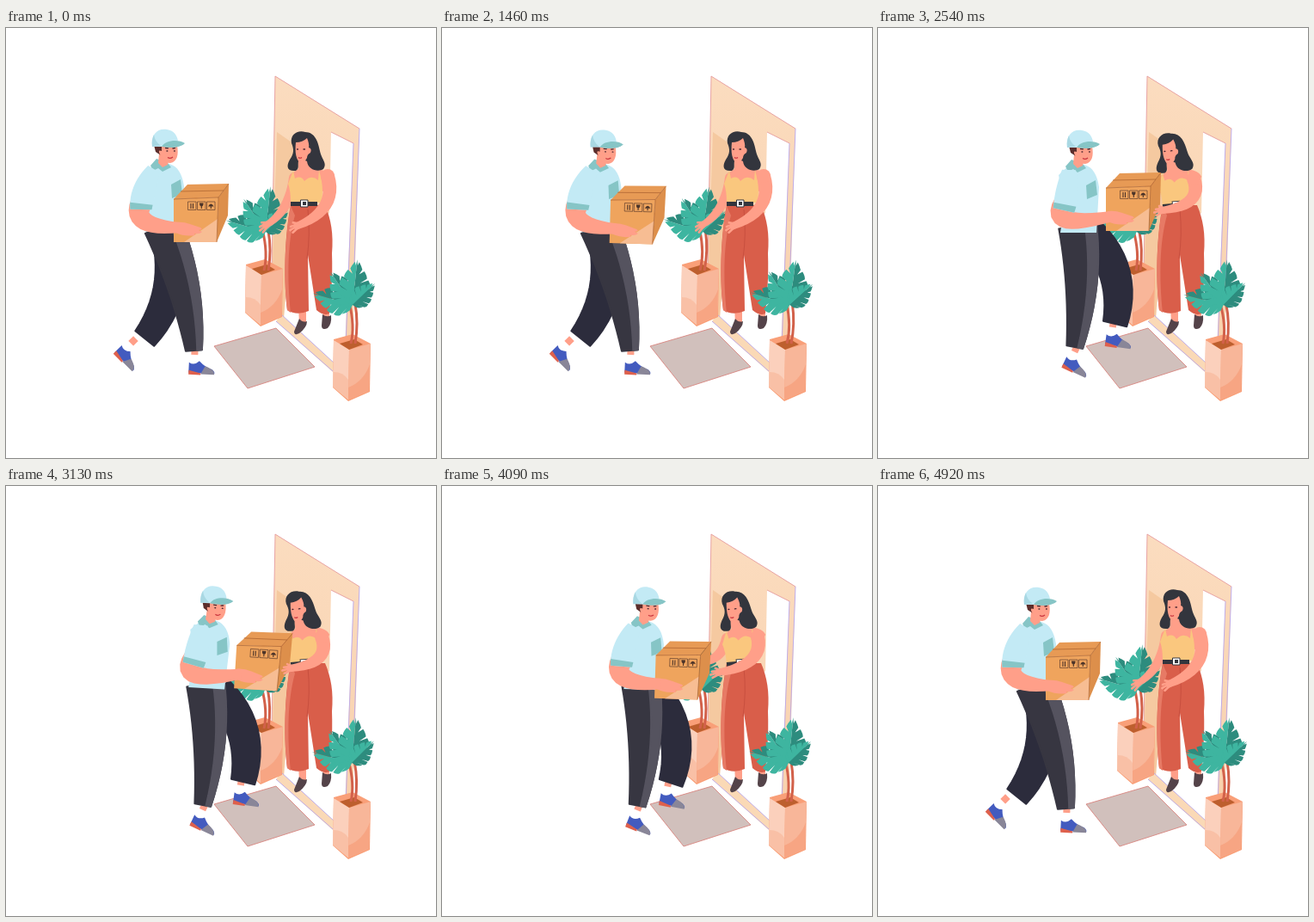
Recreate the animation shown at these times as an HTML page. Size 500x500 px, loop 4.96 s.

```html
<!DOCTYPE html>
<html lang="en">
<head>
<meta charset="utf-8">
<title>Parcel at the door</title>
<style>
html, body { margin: 0; width: 100%; height: 100%; overflow: hidden; background: #fff; }
svg { display: block; width: 100vw; height: 100vh; }
.skin { fill: #ff9f89; }
.shirt { fill: #c3eaf5; }
.teal { fill: #86c5c6; }
.dark { fill: #33353d; }
.pants { stroke-width: 2; stroke-linejoin: round; }
.finger { fill: none; stroke: #ff9f89; stroke-width: 2.6; stroke-linecap: round; }
.face { fill: none; stroke: #4a2730; stroke-width: 1.3; stroke-linecap: round; }
.lips { fill: none; stroke: #c9343e; stroke-width: 1.2; }
.stem { fill: none; stroke: #d2614a; stroke-width: 3; }
</style>
</head>
<body>
<svg viewBox="0 0 500 500">
  <defs>
    <linearGradient id="wall" x1="0" y1="0" x2="0" y2="1">
      <stop offset="0" stop-color="#fbdcbf"/><stop offset="1" stop-color="#f8d0ab"/>
    </linearGradient>
    <g id="shoe">
      <path class="skin" d="M-4 -14H4V-4H-4Z"/>
      <path fill="#fff" d="M-5 -6H5L6 6L-5 7Z"/>
      <path fill="#435bbf" d="M-6 3Q0 7 6 1Q13 8 21 10Q25 13 24 15H-6Z"/>
      <path fill="#898698" d="M13 6.500Q25 10 24 16H8Z"/>
      <path fill="#de604c" d="M-6 12L8 15V17H-6Z"/>
    </g>
    <g id="pot">
      <path fill="#f99f78" d="M0 6L22 0L43 11L42 67L17 78L-1 62Z"/>
      <path fill="#fbd0bc" d="M0 7L18 18L17 76L-1 61Z"/>
      <path fill="#f8b699" d="M18 18L43 11L41 66L17 76Z"/>
      <path fill="#f9c0a6" d="M0 44Q11 44 17 53V76L-1 61Z"/>
      <path fill="#f7a583" d="M42 35Q35 55 17 62V76L41 66Z"/>
      <path fill="#bd5f2e" d="M7 11L24 6L34 12L18 18Z"/>
    </g>
    <g id="plant"></g>
  </defs>

  <!-- doorway -->
  <path fill="url(#wall)" d="M313 56L411 117L402 398H393L404 134L378 121L376 215L330 245L322 338H308Z"/>
  <path fill="#f5c9a0" d="M315 121L338 137L331 242L323 338H308Z"/>
  <path fill="#fad9b6" d="M320 333L382 390L380 400L314 341Z"/>
  <path fill="none" stroke="#e69b9e" stroke-width=".9" d="M308 338L313 56L411 117M378 121L404 134"/>
  <path fill="none" stroke="#b9a6ea" stroke-width=".9" d="M411 117L404 300M404 134L395 370M320 333L382 390M314 341L380 399"/>
  <path fill="#d1c0bc" stroke="#d9857f" stroke-width=".9" d="M242 370L314 349L359 394L281 419Z"/>

  <use href="#pot" x="279" y="269"/>
  <use id="plantB" href="#plant"/>

  <!-- woman -->
  <path class="skin" d="M340 325h9v18h-8zM368 326h8v14h-7z"/>
  <path fill="#544349" d="M341 338Q345 343 350 341Q350 348 341 355Q335 358 335 353ZM368 333Q373 337 378 334Q379 344 374 349Q367 352 367 346Z"/>
  <path fill="#d95e4a" d="M331 206H371C378 222 381 240 379 262C380 290 378 312 376 332Q369 335 361 328L351 264L352 329Q338 335 327 328C322 285 325 236 331 206Z"/>
  <path fill="#e77a65" d="M336 218C327 250 327 292 331 331L327 328C322 285 325 240 331 207Z"/>
  <path fill="none" stroke="#c84f3f" d="M351 211Q354 240 350 268"/>
  <g id="farArm"></g>
  <g id="lady">
    <path class="skin" d="M339 149H353L354 163C366 164 376 166 379 174L370 190H331C328 178 331 168 340 164Z"/>
    <path fill="#fac77e" d="M334 166L336 175Q343 171 347 178Q355 170 363 177L364 165L367 178Q369 190 367 203H331Q331 189 328 181Z"/>
    <path class="dark" d="M331 202H362V207H331Z"/>
    <path class="dark" d="M332 134C330 124 339 118 348 121C359 121 363 132 365 143C367 153 374 157 369 164C363 168 351 165 350 155L341 151C338 159 342 163 337 166C326 167 326 160 330 153C335 146 335 141 332 134Z"/>
    <path class="skin" d="M337 133Q345 133 350 128Q353 135 352 139Q356 140 354 145Q350 147 350 151Q347 157 342 157Q335 151 337 133Z"/>
    <path class="face" d="M338.500 141h1M346 141h1.500"/>
    <path class="lips" d="M340 150.500q2 1.500 4 0"/>
    <path fill="#fff" stroke="#33353d" d="M342.500 200h8.500v8h-8.500z"/>
    <path class="dark" d="M345 202h4v4h-4z"/>
  </g>

  <use href="#pot" x="381" y="356"/>
  <use id="plantF" href="#plant"/>

  <!-- courier -->
  <use id="backShoe" href="#shoe"/>
  <path id="backLeg" class="pants" fill="#2c2c3c" stroke="#2c2c3c"/>
  <use id="frontShoe" href="#shoe"/>
  <path id="frontLeg" class="pants" fill="#373641" stroke="#373641"/>
  <path id="stripe" class="pants" fill="#55535f" stroke="#55535f"/>
  <g id="man">
    <path class="shirt" d="M174 157L190 158C200 161 205 170 207 184L204 237H162L167 205L160 170Z"/>
    <path class="teal" d="M192 182L203 176L205 193L193 198Z"/>
    <path class="teal" d="M168 160L175 152L188 157L192 162L182 167L177 163L171 166Z"/>
    <path class="skin" d="M178 146L190 150L188 159L182 162L177 157Z"/>
    <path fill="#5b2d2b" d="M172 136H185L183 150L174 144Z"/>
    <path class="skin" d="M181 137H199C201 147 199 156 191 157C184 157 180 151 179 147Q176 141 181 143Z"/>
    <path class="face" d="M187 143h.8M195.500 143h.8M185.500 139.500l3 .3M194 140l2.500-.3"/>
    <path class="lips" d="M188 150.500q3 2 6-.5"/>
    <path class="shirt" d="M170 138C168 123 177 116 187 118C196 119 199 126 200 131L185 138Z"/>
    <path fill="#a9d8e3" d="M170 138Q169 130 172 124Q173 132 180 137Z"/>
    <path class="teal" d="M181 138C185 130 201 129 208 134C203 139 193 140 181 138Z"/>
    <g id="box">
      <path fill="#e79a55" d="M195 199L211 182L259 181L247 197Z"/>
      <path fill="#dd8f4b" d="M247 197L259 181L258 218L245 249Z"/>
      <path fill="#efa45d" d="M195 199L247 197L245 249H195Z"/>
      <path fill="#f7bd93" d="M246 222L245 249H207Z"/>
      <path fill="none" stroke="#a9602f" stroke-width=".7" d="M195 199L247 197L245 249M247 197L259 181M203 190L253 189"/>
      <path fill="none" stroke="#63412e" stroke-width=".7" d="M211.500 202h9.500v9.500h-9.500zM222.500 202h9.500v9.500h-9.500zM233.500 202h9.500v9.500h-9.500z"/>
      <path fill="none" stroke="#4c3429" stroke-width="1.100" d="M215 204v6M217.500 204v6M227.300 207v3M238.300 207v3"/>
      <path fill="#4c3429" d="M225 203.500h4.600q0 4-2.300 4t-2.300-4zM235 207.500q3.300-6 6.600 0z"/>
      <path class="skin" d="M197 226Q206 225 214 228L226 232Q230 234 224 235L228 237Q225 240 219 239L220 241Q208 243 197 238Z"/>
    </g>
    <path id="forearm" class="skin"/>
    <path id="sleeve" class="shirt"/>
    <path id="hem" class="teal"/>
  </g>
  <g id="nearArm"></g>
</svg>
<script>
const LOOP = 4960;
const $ = id => document.getElementById(id);
const set = (id, name, value) => $(id).setAttribute(name, value);
const fix = n => n.toFixed(2);
const lerp = (a, b, u) => a + (b - a) * u;
const mix = (p, q, u) => p.map((v, i) => lerp(v, q[i], u));
const add = (p, x, y) => [p[0] + x, p[1] + y];
const ramp = (t, a, b) => Math.max(0, Math.min(1, (t - a) / (b - a)));
const smooth = u => u * u * (3 - 2 * u);
const cubic = u => u < .5 ? 4 * u ** 3 : 1 - 4 * (1 - u) ** 3;
// rises from a to b, falls from c to d
const pulse = (t, a, b, c, d, ease = smooth) => ease(ramp(t, a, b)) - ease(ramp(t, c, d));
const place = (id, [x, y], turn) => set(id, 'transform', `translate(${fix(x)} ${fix(y)}) rotate(${fix(turn)})`);

// parabola through a, b, c at u = 0, .5, 1
const bow = ([a, b, c], u) => a + u * (4 * b - 3 * a - c) + u * u * 2 * (a + c - 2 * b);

// band along three points with three widths; lo and hi pick a part across, from a part along
function tube(points, widths, lo = -.5, hi = .5, from = 0) {
  const xs = points.map(p => p[0]), ys = points.map(p => p[1]);
  const edge = (u, side) => {
    const dx = bow(xs, u + .01) - bow(xs, u - .01), dy = bow(ys, u + .01) - bow(ys, u - .01);
    const k = side * bow(widths, u) / Math.hypot(dx, dy);
    return fix(bow(xs, u) + dy * k) + ' ' + fix(bow(ys, u) - dx * k);
  };
  const a = [], b = [];
  for (let i = 0; i <= 12; i++) {
    const u = lerp(from, 1, i / 12);
    a.push(edge(u, lo));
    b.unshift(edge(u, hi));
  }
  return `M${a.concat(b).join('L')}Z`;
}

// slotted leaf, one light and one dark half
function leaf(turn, len) {
  const w = len * .34, wide = l => w * Math.sin(Math.PI * Math.min(1, l) ** .65);
  const half = (side, color) => {
    const at = (l, s) => `${fix(l * len)} ${fix(s * side)}`;
    let d = 'M0 0';
    for (let l = -.02; l < .75; l += .19) {
      d += `L${at(l + .05, wide(l + .07))}Q${at(l + .12, wide(l + .12) * 1.12)} ${at(l + .21, wide(l + .19))}` +
        `L${at(l + .13, wide(l + .19) * .4)}`;
    }
    return `<path fill="${color}" d="${d}L${at(1, 0)}Z"/>`;
  };
  return `<g transform="translate(0 -45) rotate(${turn})">${half(-1, '#3eb5a0')}${half(1, '#2d8c7e')}</g>`;
}
$('plant').innerHTML = '<path class="stem" d="M-2 0Q3 -20 -4 -48M3 0Q7 -24 3 -46"/>' +
  [48, 46, 53, 36].map((len, i) => leaf(196 + 40 * i, len)).join('');

// bare arm with a small hand; the elbow hangs off the line from shoulder to hand
function limb(id, shoulder, hand, sag, widths) {
  const elbow = add(mix(shoulder, hand, .45), sag, 8);
  const turn = Math.atan2(hand[1] - elbow[1], hand[0] - elbow[0]) * 180 / Math.PI;
  $(id).innerHTML = `<path class="skin" d="${tube([shoulder, elbow, hand], widths)}"/>` +
    `<circle class="skin" cx="${fix(shoulder[0])}" cy="${fix(shoulder[1])}" r="${widths[0] / 2}"/>` +
    `<g transform="translate(${hand.map(fix)}) rotate(${fix(turn)})"><ellipse class="skin" rx="5" ry="4"/>` +
    '<path class="finger" d="M0 -2L9 -3M0 0L10 1M0 2L7 4M-2 2L2 6"/></g>';
}

function legs(step, dx) {
  const back = mix([141, 371], [272, 354], step), backTurn = lerp(45, 8, step);
  const front = mix([219, 386], [226, 382], step * step), frontTurn = lerp(3, 25, step * step);
  place('backShoe', back, backTurn);
  place('frontShoe', front, frontTurn);

  const hip = [182 + dx, 230], cuff = add(front, .15 * frontTurn - 1, -11);
  const line = [hip, add(mix(hip, cuff, .5), 6, -2), cuff], widths = [44, 36, 19];
  set('frontLeg', 'd', tube(line, widths));
  set('stripe', 'd', tube(line, widths, .2, .5));

  const hip2 = [187 + 1.2 * dx, 243 - .1 * dx], cuff2 = add(back, .45 * backTurn, -10);
  const x = cuff2[0] - hip2[0], y = cuff2[1] - hip2[1], k = 15 / Math.hypot(x, y);
  set('backLeg', 'd', tube([hip2, add(mix(hip2, cuff2, .5), y * k, -x * k), cuff2], [34, 35, 28]));
}

function courier(t, step, dx) {
  const bow1 = pulse(t, 170, 950, 950, 1700), bow2 = pulse(t, 2600, 3600, 3600, 4350);
  const reach = pulse(t, 1550, 2250, 3300, 4350);
  const tilt = -4 * pulse(t, 1500, 1880, 1880, 2400);
  set('man', 'transform', `translate(${fix(dx)} ${fix(step + 3 * bow1 - 5 * bow2)}) rotate(${fix(6.5 * (bow1 + bow2))} 183 238)`);
  set('box', 'transform', `translate(${fix(20 * reach)} ${fix(-14 * reach)}) rotate(${fix(tilt)} 195 249)`);

  const shift = 9 * reach;
  const upper = [[172, 164], [161 + shift, 188], [157 + shift, 211]];
  set('sleeve', 'd', tube(upper, [16, 26, 25]));
  set('hem', 'd', tube(upper, [16, 26, 25], -.5, .5, .85));
  set('forearm', 'd', tube([[157 + shift, 204], [162 + shift, 225 - 3 * reach], [202 + 20 * reach, 232 - 14 * reach]], [25, 21, 12]));
}

function woman(t) {
  const bend = pulse(t, 1900, 2500, 4450, 4900);
  const hold = pulse(t, 1900, 2500, 3750, 4350), open = pulse(t, 3750, 4350, 4450, 4900);
  const hand = (rest, held, wide) => rest.map((v, i) => v + hold * (held[i] - v) + open * (wide[i] - v));
  set('lady', 'transform', `translate(0 ${fix(1.5 * bend)}) rotate(${fix(-5 * bend)} 347 205)`);
  limb('farArm', [335 - 4 * bend, 174 + 3 * bend], hand([303, 229], [317, 180], [284, 222]), 4, [12, 11, 7]);
  limb('nearArm', [374 - 7 * bend, 172 + 3 * bend], hand([339, 230], [331, 212], [316, 220]), 13, [16, 14, 8]);
}

function draw(t) {
  const step = pulse(t, 1440, 2390, 3830, 4780, cubic);
  const dx = 50 * (1 - (1 - step) ** 1.7);
  legs(step, dx);
  courier(t, step, dx);
  woman(t);
  const sway = 2 * pulse(t, 170, 1250, 1250, 2200) - 1.7 * pulse(t, 1900, 2650, 2650, 3700);
  place('plantB', [302, 282], sway);
  place('plantF', [403, 367], sway);
}

const start = performance.now();
function tick() {
  draw((performance.now() - start) % LOOP);
  requestAnimationFrame(tick);
}
tick();
</script>
</body>
</html>
```
